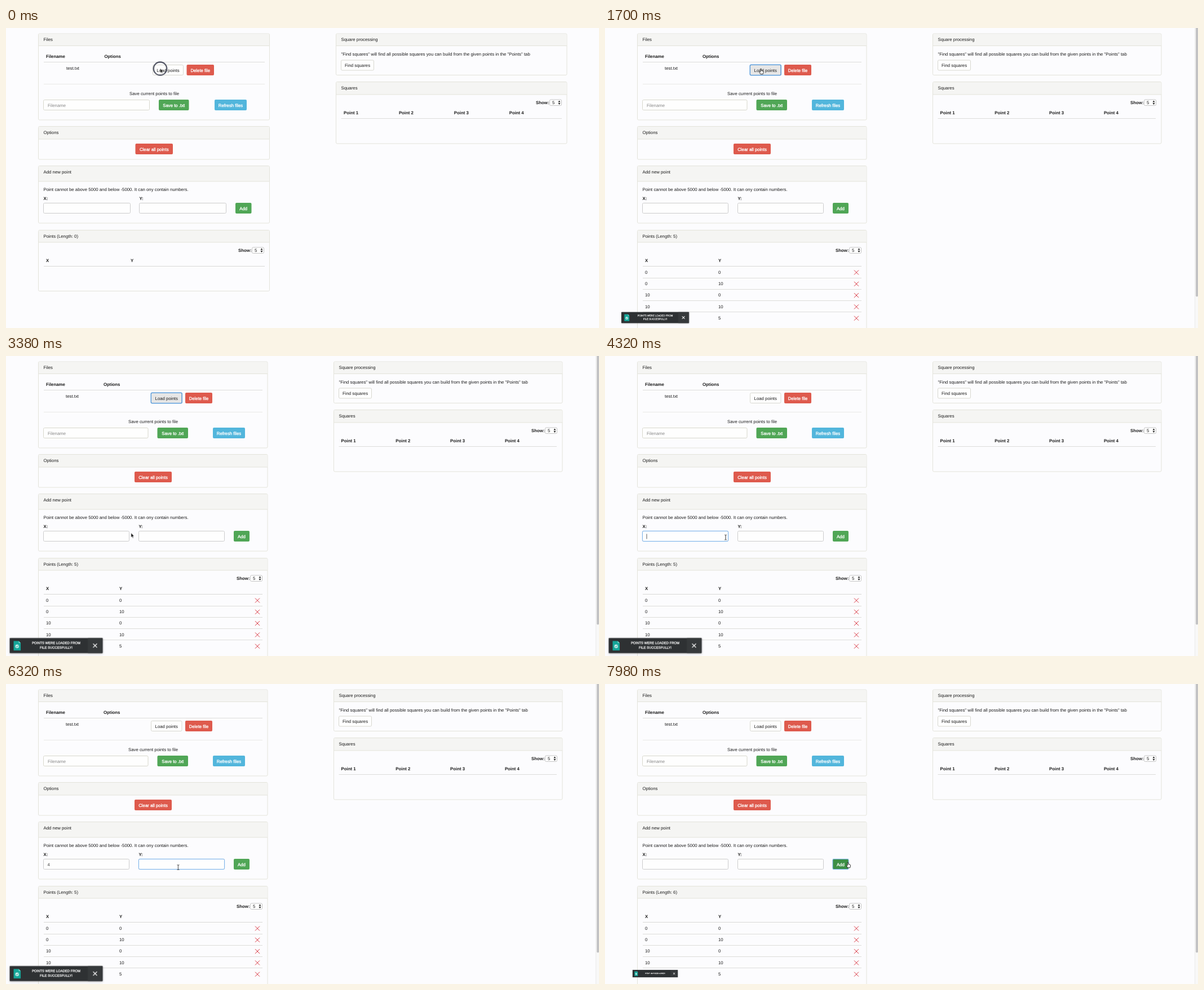
An HTML page that plays this animation: 1052 px wide and 532 px high, repeating every 8 s.

```html
<!DOCTYPE html>
<html lang="en">
<head>
<meta charset="utf-8">
<title>Square finder</title>
<style>
html, body { margin: 0; height: 100%; overflow: hidden; background: #fcfcfe; }
svg { display: block; width: 100vw; height: 100vh; }
text { font: 7.8px "Liberation Sans", Arial, sans-serif; fill: #1c1c1c; text-rendering: geometricPrecision; white-space: pre; }
.b { font-weight: bold; }
.hint { fill: #888; }
.val { fill: #444; }
.mid { text-anchor: middle; }
.end { text-anchor: end; }
.lit { fill: #fff; stroke: #fff; stroke-width: .3px; }
.note { font-size: 5.9px; fill: #fff; stroke: #fff; stroke-width: .25px; text-anchor: middle; }
.toast { transform-origin: 89px 513.5px; filter: drop-shadow(0 1px 2px rgba(0,0,0,.22)); }
</style>
</head>
<body>
<svg id="stage" viewBox="0 0 1052 532" preserveAspectRatio="none"></svg>
<script>
const LOOP = 8000;
const LOADED = 1500, X_FOCUS = 3900, X_TYPED = 4900, X_BLUR = 5500;
const Y_FOCUS = 5660, Y_TYPED = 6550, ADD_CLICK = 7780, ADDED = 7860;

const rules = [];

// Registers keyframes from [time, css, easing] stops and returns an animation style.
function anim(stops, ease) {
  const name = 'k' + rules.length;
  const body = stops.map(([t, css, e]) =>
    `${t / LOOP * 100}%{${css}${e ? ';animation-timing-function:' + e : ''}}`).join('');
  rules.push(`@keyframes ${name}{${body}}`);
  return `animation:${name} ${LOOP}ms ${ease} infinite`;
}

// Shows content between two times, optionally fading at both ends.
function during(a, b, content, fade = 0) {
  const o = v => 'opacity:' + v;
  const stops = fade
    ? [[0, o(0)], [a, o(0)], [a + fade, o(1)], [b, o(1)]]
    : [[0, o(0)], [a, o(1)]];
  if (b < LOOP) stops.push([b + fade, o(0)], [LOOP, o(0)]);
  else stops.push([LOOP, o(1)]);
  return `<g style="${anim(stops, fade ? 'linear' : 'step-end')}">${content}</g>`;
}

const text = (x, y, s, cls = '') => `<text x="${x}" y="${y}" class="${cls}">${s}</text>`;
const box = (x, y, x2, y2, fill, stroke = 'none', r = 2, sw = 1) =>
  `<rect x="${x}" y="${y}" width="${x2 - x}" height="${y2 - y}" rx="${r}" fill="${fill}" stroke="${stroke}" stroke-width="${sw}"/>`;
const path = (d, fill, stroke = 'none', sw = 1) =>
  `<path d="${d}" fill="${fill}" stroke="${stroke}" stroke-width="${sw}"/>`;
const line = (x, x2, y, color = '#ddddda') => path(`M${x} ${y}H${x2}`, 'none', color);

const EDGE = '#e3e3da', RED = '#de5a4d', GREEN = '#50a656', DARK = '#3c8f45', BLUE = '#52b6dc', GLOW = '#7db4ea';

function panel(x, x2, y, y2, head, title) {
  return box(x, y, x2, y2, '#fcfcfe', EDGE) +
    box(x + .5, y + .5, x2 - .5, head, '#f5f5f3', 'none', 1.5) +
    line(x, x2, head, EDGE) + text(x + 9, title[1], title[0]);
}

function button(x, x2, y, label, fill) {
  const shape = fill ? box(x, y, x2, y + 19, fill) : box(x + .5, y + .5, x2 - .5, y + 18.5, '#fefefe', '#d8d8d0');
  return shape + text((x + x2) / 2, y + 12.7, label, fill ? 'mid lit' : 'mid');
}

const field = (x, x2, y, color) => box(x, y, x2, y + 18, '#fefefe', color);
const focusRing = (x, x2, y) =>
  box(x - .8, y - .8, x2 + .8, y + 18.8, 'none', '#e2eefa', 2.5, .8) + box(x, y, x2, y + 18, 'none', GLOW);

function select(x, y) {
  return text(x - .5, y + 8, 'Show:', 'b end') +
    box(x + .5, y + .5, x + 21.5, y + 11, '#fff', '#c4c4c4') + text(x + 5, y + 8.3, '5') +
    path(`M${x + 15.5} ${y + 5}l2-3 2 3zm0 1.6l2 3 2-3z`, '#222');
}

function page(wide) {
  const p = (w, n) => wide ? w : n;
  const L = 57.5, L2 = p(467.5, 464), end = p(459, 455);
  const R = p(585.5, 581.5), R2 = p(995, 987);
  const load = [p(260, 257), p(315, 312.5)];
  const save = [p(271, 268.5), p(324.5, 323)];
  const add = [p(407, 404), p(435.5, 432)];
  const x2 = p(220.5, 218.5), y1 = p(236.5, 235.5), y2 = p(390.5, 387.5);
  const c = p(263, 261);
  const pressed = box(load[0] + .5, 65.5, load[1] - .5, 83.5, '#e6e6e6', '#b8b8b8') +
    text((load[0] + load[1]) / 2, 77.7, 'Load points', 'mid');
  const pressedRing = box(load[0] + .3, 65.3, load[1] - .3, 83.7, 'none', '#5f9fdc', 2, 1.5);

  let s = panel(L, L2, 10, 163, 31.5, ['Files', 23.3]) +
    text(71, 52.8, 'Filename', 'b') + text(p(174.5, 173), 52.8, 'Options', 'b') +
    line(67, end, 60.5) + text(p(107, 106), 73.6, 'test.txt') +
    button(...load, 65, 'Load points') +
    during(900, 2470, pressed) +
    during(1380, X_FOCUS, pressed + pressedRing, 100) +
    button(p(320.5, 318), p(369, 366), 65, 'Delete file', RED) +
    line(67, end, 99.5, '#e9e9e6') +
    text(c, 119, 'Save current points to file', 'mid') +
    field(66.5, p(254.5, 252), 127.5, '#d8d8cc') + text(74, 139.6, 'Filename', 'hint') +
    button(...save, 127, 'Save to .txt', GREEN) +
    during(2560, 2700, button(...save, 127, 'Save to .txt', DARK)) +
    button(p(370, 367), p(427, 424), 127, 'Refresh files', BLUE);

  s += panel(L, L2, 174.5, 233, 197, ['Options', 188.2]) +
    button(p(229.5, 228), p(296, 294), 205, 'Clear all points', RED);

  s += panel(L, L2, 244.5, 346, 272, ['Add new point', 258]) +
    text(66.5, 288.6, 'Point cannot be above 5000 and below -5000. It can ony contain numbers.') +
    text(66.5, 305, 'X:', 'b') + text(y1, 305, 'Y:', 'b') +
    field(66.5, x2, 310.5, '#ccc') + field(y1, y2, 310.5, '#ccc') +
    button(...add, 310, 'Add', GREEN);

  if (!wide) {
    const caret = (x, a, b) => during(a, b, path(`M${x} 315.5v9`, 'none', '#333', .8));
    s += during(X_FOCUS, X_BLUR, focusRing(66.5, x2, 310.5), 100) +
      during(Y_FOCUS, ADD_CLICK, focusRing(y1, y2, 310.5), 100) +
      during(X_TYPED, ADDED, text(73.5, 322.6, '4', 'val')) +
      during(Y_TYPED, ADDED, text(242, 322.6, '4', 'val')) +
      caret(74, X_FOCUS, X_FOCUS + 500) + caret(78.5, X_TYPED, X_TYPED + 500) +
      caret(242.7, Y_FOCUS, Y_FOCUS + 500) +
      caret(247, Y_TYPED, Y_TYPED + 500) + caret(247, Y_TYPED + 1000, ADD_CLICK) +
      during(6800, LOOP, button(...add, 310, 'Add', DARK)) +
      during(ADD_CLICK, LOOP, focusRing(add[0], add[1], 310.5), 100);
  }

  s += panel(L, L2, 358.5, p(466.5, 545), 380, ['', 0]) +
    (wide ? text(66.5, 371.6, 'Points (Length: 0)')
      : during(0, ADDED, text(66.5, 371.6, 'Points (Length: 5)')) +
        during(ADDED, LOOP, text(66.5, 371.6, 'Points (Length: 6)'))) +
    select(p(436, 433), 388.5) +
    text(71, 414.8, 'X', 'b') + text(p(221, 201), 414.8, 'Y', 'b') + line(67, end, 422.5, '#d8d8d6');
  if (!wide) {
    [[0, 0], [0, 10], [10, 0], [10, 10], [5, 5]].forEach(([x, y], i) => {
      const dy = i * 20.3;
      s += text(71, 435.7 + dy, x) + text(201, 435.7 + dy, y) +
        path(`M442 ${429.5 + dy}l8 8m0-8l-8 8`, 'none', '#d8343f', 1) +
        (i < 4 ? line(67, end, Math.round(442.5 + dy) + .5) : '');
    });
  }

  s += panel(R, R2, 10, 83.5, 31.5, ['Square processing', 23.3]) +
    text(R + 9, 48.5, '"Find squares" will find all possible squares you can build from the given points in the "Points" tab') +
    button(R + 8.5, p(653, 649), 56.5, 'Find squares') +
    panel(R, R2, 95.5, 205, 118, ['Squares', 109.3]) +
    select(p(964, 956), 126.5) + line(R + 9, p(986, 977), 160.5);
  for (let i = 0; i < 4; i++) s += text(p(599, 594.5) + i * p(97.9, 96.8), 152.8, 'Point ' + (i + 1), 'b');

  if (!wide) s += box(1046, 0, 1052, 532, '#f8f8f8', 'none', 0) +
    path('M1046.5 0V532', 'none', '#ebebeb') + box(1048, -4, 1052, 476.5, '#c2c2c4');
  return s;
}

function toast(stops, lines) {
  const css = (v, o = 1) => `opacity:${o};transform:scale(${v})`;
  const style = anim(stops.map(([t, v, o]) => [t, css(v, o)]), 'linear');
  const top = 515 - 4 * (lines.length - 1);
  return `<g class="toast" style="${style}">` +
    box(6.5, 500, 171.5, 527, '#2e3133', 'none', 1) + box(145, 500, 171.5, 527, '#36393b', 'none', 1) +
    path('M13.5 505.5h9l3.5 3.5v13h-12.5z', '#15a699') + path('M22.5 505.5v3.5h3.5z', '#7fd4cb') +
    '<circle cx="19.7" cy="514.8" r="3.2" fill="#d8f3f0"/>' +
    path('M18 514.8l1.3 1.3 2.3-2.5', 'none', '#15a699') +
    path('M154.5 510l7 7m0-7l-7 7', 'none', '#fff', 1.2) +
    lines.map((l, i) => text(89, top + 8.2 * i, l, 'note')).join('') + '</g>';
}

function toasts() {
  return toast([[0, .3, 0], [1629, .3, 0], [1630, .3], [1760, 1.08], [1880, .97], [1980, 1],
      [7060, 1], [7360, .3, 0], [LOOP, .3, 0]],
      ['POINTS WERE LOADED FROM', 'FILE SUCCESFULLY!']) +
    toast([[0, .3, 0], [7949, .3, 0], [7950, .3], [LOOP, .6]], ['POINT HAS BEEN ADDED!']);
}

function cursor() {
  const at = (t, x, y, e) => [t, `transform:translate(${x}px,${y}px)`, e];
  const move = anim([
    at(0, 273.5, 71.5), at(600, 273.5, 71.5), at(1000, 276.5, 72), at(2450, 276.5, 72, 'ease-in'),
    at(2640, 290, 155, 'linear'), at(3000, 305, 230, 'ease-out'), at(3500, 214, 321.5),
    at(4750, 214, 321.5), at(5300, 305.5, 325), at(6600, 305.5, 325), at(6950, 426, 320.5),
    at(7250, 426, 320.5), at(7550, 431, 316), at(LOOP, 431, 316)
  ], 'ease-in-out');
  const arrow = path('M0 0V8L1.8 6.4 3 9.3 4.3 8.7 3.1 6H5.6Z', '#111', '#fff', .6);
  const hand = path('M-.9.6Q0-.5.9.6V3.6L3.8 4.4Q4.8 4.9 4.5 6.4L3.7 9.8H-.6L-2.6 6.3Q-2.4 5-.9 6Z', '#fff', '#111', .9);
  const beam = path('M-1.8-4.3Q0-4.3 0-3.2Q0-4.3 1.8-4.3M0-3.2V3.4M-1.8 4.5Q0 4.5 0 3.4Q0 4.5 1.8 4.5', 'none', '#222', .9);
  const ring = '<circle cy=".5" r="11.7" fill="none" stroke="#14182c" stroke-width="1.7"/>';
  return `<g style="${move}">` + during(0, 160, ring) +
    [[0, 900], [2480, 2550], [2620, 3420], [6780, 6860]].map(([a, b]) => during(a, b, arrow)).join('') +
    [[900, 2480], [2550, 2620], [6860, LOOP]].map(([a, b]) => during(a, b, hand)).join('') +
    during(3420, 6780, beam) + '</g>';
}

const art = during(0, LOADED, page(true)) + during(LOADED, LOOP, page(false)) + toasts() + cursor();
const sheet = document.createElement('style');
sheet.textContent = rules.join('\n');
document.head.append(sheet);
document.getElementById('stage').innerHTML = art;
</script>
</body>
</html>
```
